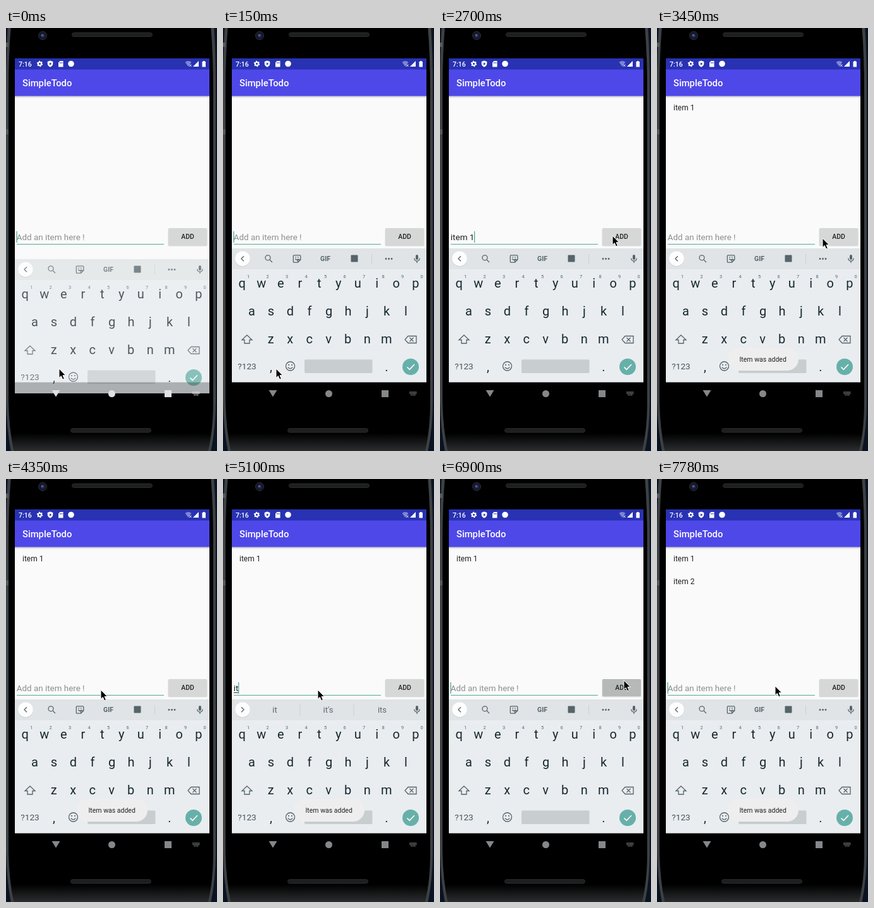
An HTML page for the animation above (8000 ms loop, 334 by 668 pixels).

```html
<!DOCTYPE html>
<html lang="en">
<head>
<meta charset="utf-8">
<title>Todo app demo</title>
<style>
  html, body { margin: 0; width: 100%; height: 100%; overflow: hidden; background: #000; }
  svg { display: block; width: 334px; height: 668px; font-family: Roboto, "Noto Sans", sans-serif; }
  text { white-space: pre; }
  .mid { text-anchor: middle; }
  .key { font-size: 20px; fill: #18282f; }
  .num { font-size: 7.5px; fill: #59666c; }
  .word { font-size: 13px; fill: #5a666c; }
  .line { fill: none; stroke: #56646b; stroke-width: 1.3; }
  .solid { fill: #56646b; }
</style>
</head>
<body>
<svg viewBox="0 0 334 668">
  <defs>
    <linearGradient id="chin" gradientUnits="userSpaceOnUse" x1="0" y1="640" x2="0" y2="668">
      <stop offset="0" stop-color="#000"/>
      <stop offset="1" stop-color="#2b2d2f"/>
    </linearGradient>
    <linearGradient id="shadow" x2="0" y2="1">
      <stop offset="0" stop-color="#000" stop-opacity=".24"/>
      <stop offset="1" stop-color="#000" stop-opacity="0"/>
    </linearGradient>
  </defs>

  <!-- phone -->
  <rect width="334" height="668" fill="#0a1322"/>
  <path d="M3 -5Q0 40 0 90V590Q1 635 9 675H323Q332 635 332 590V90Q332 40 329 -5Z" fill="#3e4144"/>
  <path d="M8 -5Q4 40 4 100V590Q5 640 14 675H318Q328 640 328 590V100Q328 40 324 -5Z" fill="url(#chin)"/>
  <path d="M0 23H4V30H0ZM0 160H4V168H0Z" fill="#55595c"/>
  <circle cx="58" cy="12" r="6.5" fill="#17181c" stroke="#2c2e33"/>
  <circle cx="58" cy="12" r="3" fill="#222f78"/>
  <circle cx="57.4" cy="11.4" r="1.2" fill="#6478d0"/>
  <g fill="#1d1e1f" stroke="#2c2d2e">
    <rect x="104.500" y="7.500" width="127" height="6" rx="3"/>
    <rect x="102.500" y="632.500" width="127" height="6" rx="3"/>
  </g>

  <!-- app -->
  <rect x="14" y="48" width="308" height="529" fill="#fafafa"/>
  <rect x="14" y="107" width="308" height="4" fill="url(#shadow)"/>
  <rect x="14" y="65" width="308" height="42.400" fill="#4f48e9"/>
  <rect x="14" y="48" width="308" height="17.500" fill="#2832b3"/>
  <g fill="#fff">
    <text x="20" y="60.500" font-size="10.500" font-weight="500">7:16</text>
    <text x="26" y="92" font-size="14.800" font-weight="500">SimpleTodo</text>
    <circle cx="53.500" cy="56.500" r="2.600" fill="none" stroke="#fff" stroke-width="2"/>
    <circle cx="53.500" cy="56.500" r="4" fill="none" stroke="#fff" stroke-width="1.400" stroke-dasharray="2.100 2.089"/>
    <path d="M70 51.500L74.300 53V56.500Q74 60 70 61.800Q66 60 65.700 56.500V53Z"/>
    <path d="M69 54.500L72.300 56.600L69 58.700Z" fill="#2832b3"/>
    <path d="M85.500 52H90.500V61.500H83V54.500Z"/>
    <path d="M85.500 54V56M87.200 54V56M88.900 54V56" stroke="#2832b3" stroke-width=".8"/>
    <circle cx="103" cy="56.500" r="4.800"/>
    <path d="M283.500 54Q288.500 50 293.500 54L288.500 61Z" opacity=".4"/>
    <path d="M290 57.500L293.500 61M293.500 57.500L290 61" stroke="#fff" stroke-width=".9"/>
    <path d="M305 52V61H296Z"/>
    <path d="M310.500 53H312V52H314.500V53H316V61.500H310.500Z"/>
  </g>
  <g font-size="12" fill="#222">
    <text id="item1" x="26" y="130">item 1</text>
    <text id="item2" x="26" y="166">item 2</text>
  </g>
  <text id="hint" x="16.800" y="335" font-size="13.400" fill="#8d8f8f">Add an item here !</text>
  <text id="field" x="16.800" y="335" font-size="13.500" fill="#202222"></text>
  <rect id="compose" x="17" y="337" height="1" fill="#333"/>
  <rect x="17" y="341" width="233" height="1" fill="#55ab97"/>
  <rect id="caret" y="321" width="1.200" height="18" fill="#45a590"/>
  <rect x="256.500" y="316.500" width="62" height="28" rx="2" fill="#000" opacity=".14"/>
  <rect id="button" x="257" y="316" width="61" height="27" rx="1.500"/>
  <text class="mid" x="287.500" y="333.300" font-size="10.500" font-weight="500" fill="#222">ADD</text>

  <!-- keyboard -->
  <g id="keyboard">
    <rect x="14" y="348" width="308" height="212" fill="#e9edf0"/>
    <rect x="14" y="348" width="308" height="33" fill="#e0e4e6"/>
    <circle cx="31" cy="364.800" r="12" fill="#c7cbcd"/>
    <circle cx="31" cy="364.200" r="11.800" fill="#fdfdfd"/>
    <path id="chevron" class="line"/>
    <g id="tools">
      <circle class="line" cx="71" cy="362.800" r="4"/>
      <path class="line" d="M74 366L78 370"/>
      <path class="line" d="M112.500 358.800H121.500Q122.800 358.800 122.800 360V366L118.500 370.200H112.500Q111.300 370.200 111.300 369V360Q111.300 358.800 112.500 358.800ZM122.800 366H118.500V370"/>
      <path class="line" d="M114.300 364.500Q117 368 119.700 364.500M114.500 362H116M118 362H119.500"/>
      <text class="mid solid" x="162" y="368.200" font-size="10.500" font-weight="700">GIF</text>
      <rect class="solid" x="202.500" y="358.500" width="11" height="11" rx="1"/>
      <path d="M235.500 357V372" stroke="#cbd0d3"/>
      <circle class="solid" cx="258" cy="364.500" r="1.400"/>
      <circle class="solid" cx="262.500" cy="364.500" r="1.400"/>
      <circle class="solid" cx="267" cy="364.500" r="1.400"/>
    </g>
    <g id="words">
      <path d="M122 355V374M207 355V374" stroke="#cbd0d3"/>
      <text class="mid word" x="82" y="369"></text>
      <text class="mid word" x="166.500" y="369"></text>
      <text class="mid word" x="252" y="369"></text>
    </g>
    <rect class="solid" x="305" y="358" width="4" height="8" rx="2"/>
    <path class="line" d="M302.800 363.500Q303 368 307 368Q311 368 311.200 363.500M307 368V371"/>
    <g id="keys"></g>
    <path class="line" d="M38 485L46 492.500H42V498H34V492.500H30Z"/>
    <path class="line" d="M293 486.500H306V497.500H293L288 492ZM295.500 489L301.500 495M301.500 489L295.500 495"/>
    <text class="mid" x="38" y="539.300" font-size="13.700" fill="#45545b">?123</text>
    <text class="mid key" x="76" y="542">,</text>
    <circle class="line" cx="106.500" cy="534" r="7"/>
    <path class="line" d="M102.800 535.800Q106.500 540 110.200 535.800"/>
    <circle class="solid" cx="104" cy="532" r="1.100"/>
    <circle class="solid" cx="109" cy="532" r="1.100"/>
    <rect x="129" y="523.500" width="107.500" height="21.500" rx="2" fill="#c8cdd0"/>
    <text class="mid key" x="259" y="542">.</text>
    <circle cx="297" cy="535" r="13" fill="#67b0a9"/>
    <path d="M291.500 535.500L295.300 539.300L303 531.200" fill="none" stroke="#fff" stroke-width="1.600"/>
  </g>

  <!-- toast -->
  <g id="toast">
    <rect x="112" y="505" width="112" height="36" rx="18" fill="#eeeeee"/>
    <text class="mid" x="167.700" y="527.300" font-size="10.500" fill="#222">Item was added</text>
  </g>

  <!-- navigation bar -->
  <rect id="navBar" x="14" y="559.500" width="308" height="17.500"/>
  <g id="navIcons">
    <path d="M72.500 572H85.500L79 582.500Z"/>
    <circle cx="167.500" cy="577.500" r="5.500"/>
    <rect x="251" y="572" width="11" height="11"/>
    <path d="M295.500 575H307M295.500 577.300H307M297.500 579.600H305" fill="none" stroke-width="1.500" stroke-dasharray="1.500 .8"/>
  </g>

  <path id="mouse" d="M0 0V14.500L3.300 11.500L5.700 17L8.300 15.900L6 10.600H10.500Z" fill="#000" stroke="#fff" stroke-width="1"/>
</svg>
<script>
const LOOP = 8000;
const $ = id => document.getElementById(id);
const show = (id, on) => { $(id).style.display = on ? "" : "none"; };

// Each step changes only the named parts of the screen.
const start = { rising: true, text: "", composing: false, words: null, caret: true,
                items: 0, toast: 0, pressed: false, mouse: [84, 538] };
const clear = { text: "", composing: false, words: null, caret: true };
const type = (text, words, composing = true) => ({ text, words, composing, caret: true });
const move = (x, y) => ({ mouse: [x, y] });
const I = ["i", "I", "it"], IT = ["it", "it's", "its"], ITE = ["ite", "it", "it's"], NEXT = ["in", "is", "and"];

const steps = [
  [150, { rising: false }],
  [750, type("i", null)],
  [900, type("i", I)],
  [1050, type("it", IT)],
  [1200, type("ite", ITE)],
  [1350, type("item ", NEXT, false)],
  [1650, type("item 1", null, false)],
  [2100, move(88, 528)],
  [2250, { ...move(118, 478), caret: false }],
  [2400, move(190, 395)],
  [2550, move(264, 314)],
  [2700, { ...move(273, 328), caret: true }],
  [3000, { pressed: true }],
  [3150, clear],
  [3300, { pressed: false, items: 1, toast: 0.6 }],
  [3450, { ...move(262, 332), caret: false, toast: 1 }],
  [3600, move(218, 338)],
  [3750, move(170, 336)],
  [3900, { ...move(150, 333), caret: true }],
  [4350, { caret: false }],
  [4800, type("i", I)],
  [5100, type("it", IT)],
  [5250, { ...type("ite", ITE), toast: 0.5 }],
  [5400, { ...type("item", ["item", "items", "it"]), toast: 0 }],
  [5550, type("item ", NEXT, false)],
  [5700, type("item 2", null, false)],
  [5850, move(190, 328)],
  [6000, move(264, 313)],
  [6150, move(284, 303)],
  [6300, { ...move(291, 301), caret: false }],
  [6450, move(292, 311)],
  [6600, move(291, 318)],
  [6750, { pressed: true, caret: true }],
  [6900, clear],
  [7050, { pressed: false }],
  [7200, { ...move(270, 322), items: 2, toast: 0.6 }],
  [7350, { ...move(215, 329), toast: 1, caret: false }],
  [7490, move(187, 327)],
  [7780, { caret: true }]
];

function addKeys() {
  const label = (cls, x, y, s) => `<text class="mid ${cls}" x="${x}" y="${y}">${s}</text>`;
  const rows = [["qwertyuiop", 30.3, 409.5], ["asdfghjkl", 45.5, 453.5], ["zxcvbnm", 75.7, 497.5]];
  let out = "";
  for (const [chars, x, y] of rows)
    [...chars].forEach((c, i) => { out += label("key", x + i * 30.5, y, c); });
  [..."1234567890"].forEach((c, i) => { out += label("num", 40 + i * 30.5, 394.5, c); });
  $("keys").innerHTML = out;
}

function draw(s) {
  $("keyboard").setAttribute("transform", `translate(0 ${s.rising ? 17 : 0})`);
  $("keyboard").setAttribute("opacity", s.rising ? 0.77 : 1);
  $("navBar").setAttribute("fill-opacity", s.rising ? 0.27 : 1);
  const icon = s.rising ? "#dfe1e2" : "#85888a";
  $("navIcons").setAttribute("fill", icon);
  $("navIcons").lastElementChild.setAttribute("stroke", icon);

  show("item1", s.items > 0);
  show("item2", s.items > 1);
  show("hint", !s.text);
  $("field").textContent = s.text;
  const width = s.text ? $("field").getComputedTextLength() : 0;
  show("compose", s.composing);
  $("compose").setAttribute("width", width);
  show("caret", s.caret);
  $("caret").setAttribute("x", 16.4 + width);
  $("button").setAttribute("fill", s.pressed ? "#b5b9b8" : "#d6d7d7");

  show("tools", !s.words);
  show("words", s.words);
  $("chevron").setAttribute("d", s.words ? "M29 360.300L33 364.300L29 368.300" : "M33 360.300L29 364.300L33 368.300");
  if (s.words) $("words").querySelectorAll("text").forEach((el, i) => { el.textContent = s.words[i]; });

  $("toast").setAttribute("opacity", s.toast);
  $("mouse").setAttribute("transform", `translate(${s.mouse})`);
}

let last = -1;
function tick() {
  const t = performance.now() % LOOP;
  const count = steps.filter(([at]) => at <= t).length;
  if (count !== last) {
    last = count;
    draw(Object.assign({}, start, ...steps.slice(0, count).map(step => step[1])));
  }
  requestAnimationFrame(tick);
}

addKeys();
tick();
</script>
</body>
</html>
```
